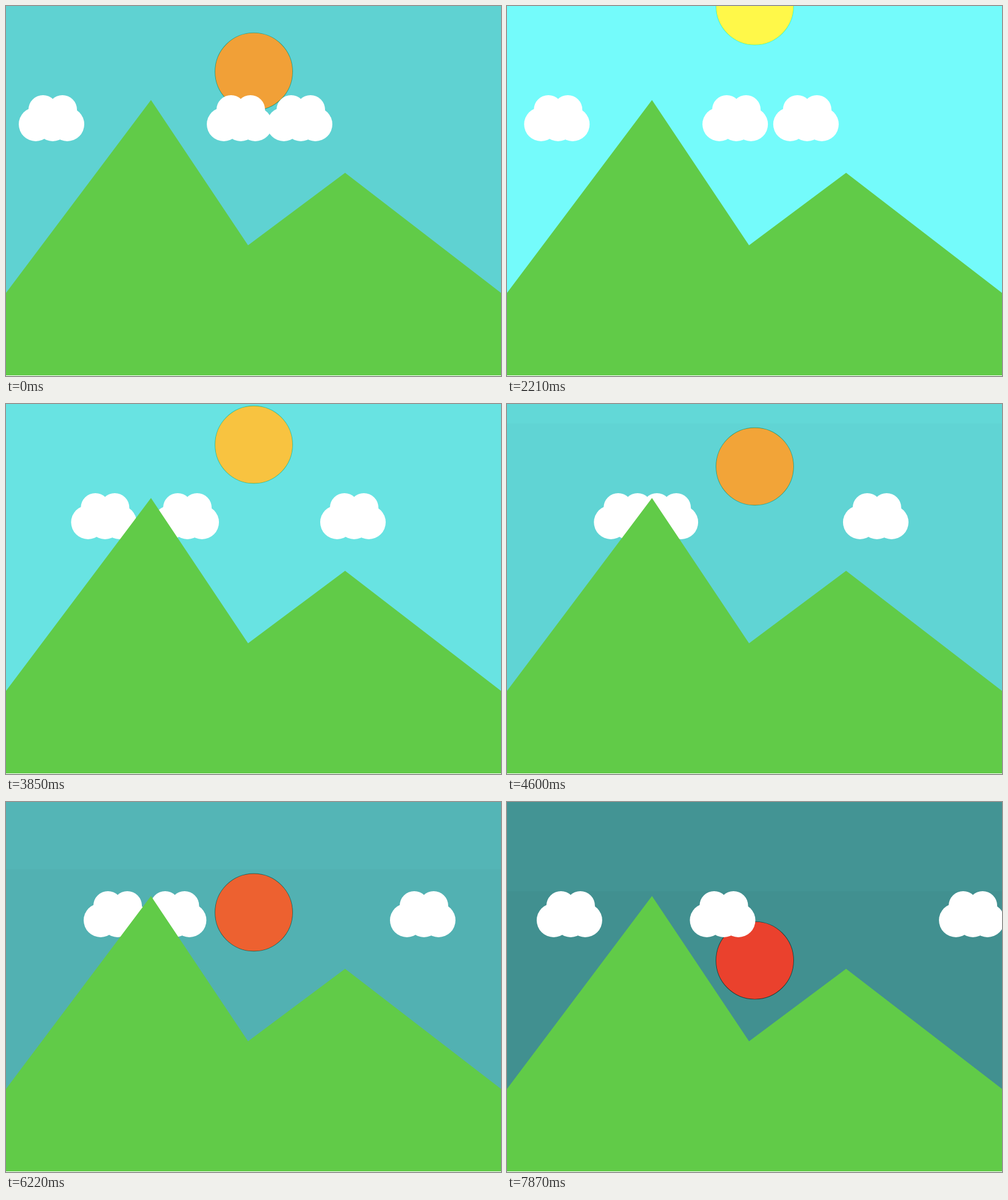
Write an HTML page with a canvas that moves like this. It is 816x610 px and loops after 8000 ms.

```html
<!DOCTYPE html>
<html lang="en">
<head>
<meta charset="utf-8">
<title>Mountains</title>
<style>
  html, body { margin: 0; width: 100%; height: 100%; overflow: hidden; background: #fff; }
  canvas { display: block; }
</style>
</head>
<body>
<canvas id="stage" width="816" height="609"></canvas>
<script>
const ctx = document.getElementById("stage").getContext("2d");
const W = 816, H = 609, LOOP = 8000, STEPS = 54;
const SPEED = 7.19; // pixels per step, shared by sun and clouds

// Step start times: 150 ms each, a few are 140 ms
const shortSteps = new Set([0, 4, 10, 14, 20, 31, 34, 38]);
const starts = [0];
for (let i = 0; i < STEPS - 1; i++) starts.push(starts[i] + (shortSteps.has(i) ? 140 : 150));

// Sun height -> sky and sun colour
const tones = [
  { y: 1, sky: [116, 251, 251], sun: [255, 248, 73] },
  { y: 58, sky: [106, 231, 230], sun: [249, 203, 66] },
  { y: 108, sky: [95, 210, 210], sun: [241, 160, 55] },
  { y: 182, sky: [82, 177, 178], sun: [237, 97, 48] },
  { y: 261, sky: [65, 144, 144], sun: [234, 65, 45] }
];

function tone(y, key) {
  let i = 0;
  while (i < tones.length - 2 && y > tones[i + 1].y) i++;
  const a = tones[i], b = tones[i + 1];
  const k = Math.max(0, Math.min(1, (y - a.y) / (b.y - a.y)));
  return `rgb(${a[key].map((v, n) => Math.round(v + (b[key][n] - v) * k)).join(",")})`;
}

// Constant speed with a rebound at a given step
const bounce = (low, turn, step) => low + SPEED * Math.abs(step - turn);
const sunY = step => bounce(-5.9, 15.86, step);

function disc(x, y, r) {
  ctx.beginPath();
  ctx.arc(x, y, r, 0, Math.PI * 2);
  ctx.fill();
}

function drawSky(step, y) {
  ctx.fillStyle = tone(y, "sky");
  ctx.fillRect(0, 0, W, H);
  // While the sun sets, the upper sky dims slightly later
  const edge = Math.round(Math.min(y - 64 - SPEED, 147));
  if (step > 16 && edge > 0) {
    ctx.fillStyle = tone(sunY(step - 1.2), "sky");
    ctx.fillRect(0, 0, W, edge);
  }
}

function drawSun(y) {
  ctx.fillStyle = tone(y, "sun");
  disc(408.5, y, 64);
  // Thin rim where sun and sky colours multiply
  ctx.globalCompositeOperation = "multiply";
  ctx.strokeStyle = tone(y, "sky");
  ctx.lineWidth = 0.9;
  ctx.stroke();
  ctx.globalCompositeOperation = "source-over";
}

function drawCloud(x) {
  ctx.fillStyle = "#fff";
  for (const dx of [28, 56, 80]) disc(x + dx, 195, 28);
  for (const dx of [40, 72]) disc(x + dx, 171, 24);
}

function drawMountains() {
  ctx.fillStyle = "#61cb48";
  ctx.beginPath();
  ctx.moveTo(0, 473);
  ctx.lineTo(239, 155);
  ctx.lineTo(399, 394.5);
  ctx.lineTo(559, 275);
  ctx.lineTo(W, 473);
  ctx.lineTo(W, H);
  ctx.lineTo(0, H);
  ctx.fill();
}

function draw(time) {
  let step = STEPS - 1;
  while (starts[step] > time) step--;
  const y = sunY(step);
  drawSky(step, y);
  drawSun(y);
  drawCloud(bounce(-29.3, 7, step));
  drawCloud(331 + SPEED * step);
  drawCloud(430 - SPEED * step);
  drawMountains();
}

const begin = performance.now();
function tick() {
  draw((performance.now() - begin) % LOOP);
  requestAnimationFrame(tick);
}
tick();
</script>
</body>
</html>
```
